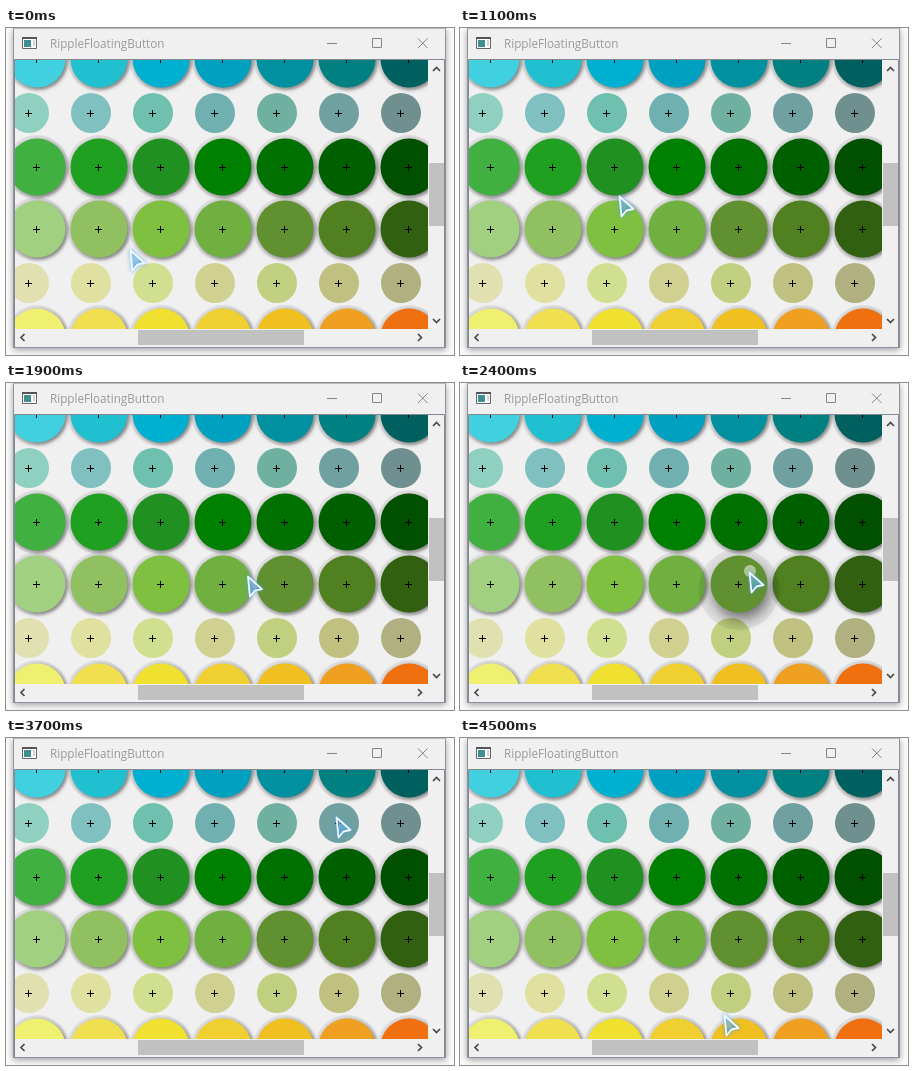
These frames come from a looping animation (448x327 px, 4600 ms). An HTML page with a canvas:

```html
<!DOCTYPE html>
<html lang="en">
<head>
<meta charset="utf-8">
<title>RippleFloatingButton</title>
<style>
  html, body { margin: 0; width: 100%; height: 100%; overflow: hidden; background: #fcfcfc; }
  .window {
    position: absolute; left: 7px; top: 0; width: 431px; height: 318px;
    border: 1px solid #8b93a0; border-top-color: #b5b8bd; background: #f0f0f0;
    box-shadow: 0 2px 7px rgba(0, 0, 0, .38);
  }
  .title {
    position: absolute; left: 44px; top: 7px; line-height: 17px; white-space: nowrap;
    font: 11.7px/17px "Open Sans", "Noto Sans", sans-serif; color: #999;
  }
  svg, canvas { position: absolute; left: 0; top: 0; }
</style>
</head>
<body>
<div class="window"></div>
<div class="title">RippleFloatingButton</div>
<svg width="448" height="327" fill="none">
  <path d="M16.5 9.5h14v11h-14z" fill="#fff" stroke="#666"/>
  <path d="M16 9h15v2h-15z" fill="#555"/>
  <path d="M18 12h7v7h-7z" fill="#3f8f92"/>
  <path d="M27 13h2m-2 2h2m-2 2h2" stroke="#aaa"/>
  <path d="M321 15.5h10M366.5 10.5h9v9h-9zM412 10.5l9.5 9.5M421.5 10.5l-9.5 9.5" stroke="#858585"/>
  <path d="M8.5 319V31.5H438.5V319" stroke="#828790"/>
  <path d="M423 135h15v63h-15zM132 302h166v15h-166z" fill="#c1c1c1"/>
  <path d="M427 43l3.5-3.5 3.5 3.5M427 291l3.5 3.5 3.5-3.5M18.500 306l-3.500 3.500 3.500 3.500M412 306l3.500 3.500-3.500 3.500" stroke="#484848" stroke-width="1.7"/>
</svg>
<canvas width="448" height="327"></canvas>
<script>
const ctx = document.querySelector('canvas').getContext('2d');
const LOOP = 4600, STEP = 100;

const rows = [
  { y: 31, colors: '4de 2cd 0bd 0ac 09a 088 066' },
  { y: 85, small: true, colors: '9dc 8cc 7cb 7bb 7ba 7aa 799' },
  { y: 139, colors: '4b4 2a2 292 080 070 060 050' },
  { y: 201, colors: 'ad8 9c6 8c4 7b4 693 582 361' },
  { y: 255, small: true, colors: 'eeb eea de9 dd9 cd8 cc8 bb8' },
  { y: 309, colors: 'ff7 fe5 fe3 fd3 fc2 fa2 f71' }
];
// Each digit is a multiple of 16, giving a slightly muted palette.
const shade = code => '#' + [...code].map(d => d + '0').join('');
const buttons = rows.flatMap(({ y, small, colors }) => colors.split(' ').map((code, i) => ({
  x: (small ? 23 : 31) + 62 * i, y, small, r: small ? 20 : 28.5, color: shade(code)
})));

const presses = [
  { button: buttons[16], x: 146, y: 139, start: 300 },
  { button: buttons[25], x: 290, y: 188, start: 2300 }
];

// time, x, y of the pointer tip
const path = [
  [0, 124, 222], [400, 143, 137], [800, 143, 137], [1400, 175, 199], [2300, 289, 189],
  [2500, 289, 189], [3000, 320, 197], [3300, 320, 197], [3700, 330, 79], [3800, 330, 79],
  [4500, 264, 277], [4600, 264, 277]
];

function pointerAt(t) {
  const i = path.findIndex(p => p[0] > t);
  const [t0, x0, y0] = path[i - 1], [t1, x1, y1] = path[i];
  const u = (t - t0) / (t1 - t0), k = u * u * (3 - 2 * u);
  return [x0 + (x1 - x0) * k, y0 + (y1 - y0) * k];
}

function disc(x, y, r, fill) {
  ctx.beginPath();
  ctx.arc(x, y, r, 0, 2 * Math.PI);
  ctx.fillStyle = fill;
  ctx.fill();
}

function drawButton({ x, y, r, color, small }, lift = 0, sink = 0) {
  ctx.save();
  if (!small) {
    disc(x, y + sink, 32 + 8.5 * lift, 'rgba(0,0,0,.07)');
    ctx.shadowColor = 'rgba(0,0,0,.5)';
    ctx.shadowBlur = 4 + 9 * lift;
    ctx.shadowOffsetX = 1.5 + lift;
    ctx.shadowOffsetY = 1.5 + 5 * lift;
  }
  disc(x, y, r, color);
  ctx.restore();
  ctx.fillStyle = '#000';
  ctx.fillRect(x - 4, y, 7, 1);
  ctx.fillRect(x - 1, y - 3, 1, 7);
}

function drawPress({ button, x, y, start }, t) {
  const age = t - start;
  const fade = Math.min(1, (600 - age) / 200);
  drawButton(button, Math.min(1, age / 100) * fade, Math.max(0, 7 * (1 - age / 400)));
  ctx.save();
  ctx.beginPath();
  ctx.arc(button.x, button.y, button.r, 0, 2 * Math.PI);
  ctx.clip();
  disc(x, y, 6 * (age / 100) ** 1.6, `rgba(255,255,255,${.5 * fade})`);
  ctx.restore();
}

function drawPointer(x, y) {
  ctx.save();
  ctx.translate(x, y);
  const arrow = new Path2D('M.5 .5L2.500 20.500L7.500 14.500L14.500 13Z');
  const fill = ctx.createLinearGradient(0, 0, 9, 18);
  fill.addColorStop(0, 'rgba(190,222,245,.6)');
  fill.addColorStop(1, 'rgba(60,145,205,.6)');
  ctx.fillStyle = fill;
  ctx.fill(arrow);
  ctx.lineJoin = 'round';
  ctx.shadowColor = '#4a9fe0';
  ctx.shadowBlur = 4;
  ctx.strokeStyle = '#edf8ff';
  ctx.lineWidth = 1.8;
  ctx.stroke(arrow);
  ctx.restore();
}

function draw(t) {
  const active = presses.filter(p => t > p.start && t < p.start + 600);
  ctx.clearRect(0, 0, 448, 327);
  ctx.save();
  ctx.beginPath();
  ctx.rect(9, 32, 413, 269);
  ctx.clip();
  buttons.filter(b => !active.some(p => p.button === b)).forEach(b => drawButton(b));
  active.forEach(p => drawPress(p, t));
  ctx.restore();
  drawPointer(...pointerAt(t));
}

const origin = performance.now();
function tick() {
  const t = (performance.now() - origin) % LOOP;
  draw(Math.floor(t / STEP) * STEP);
  requestAnimationFrame(tick);
}
tick();
</script>
</body>
</html>
```
